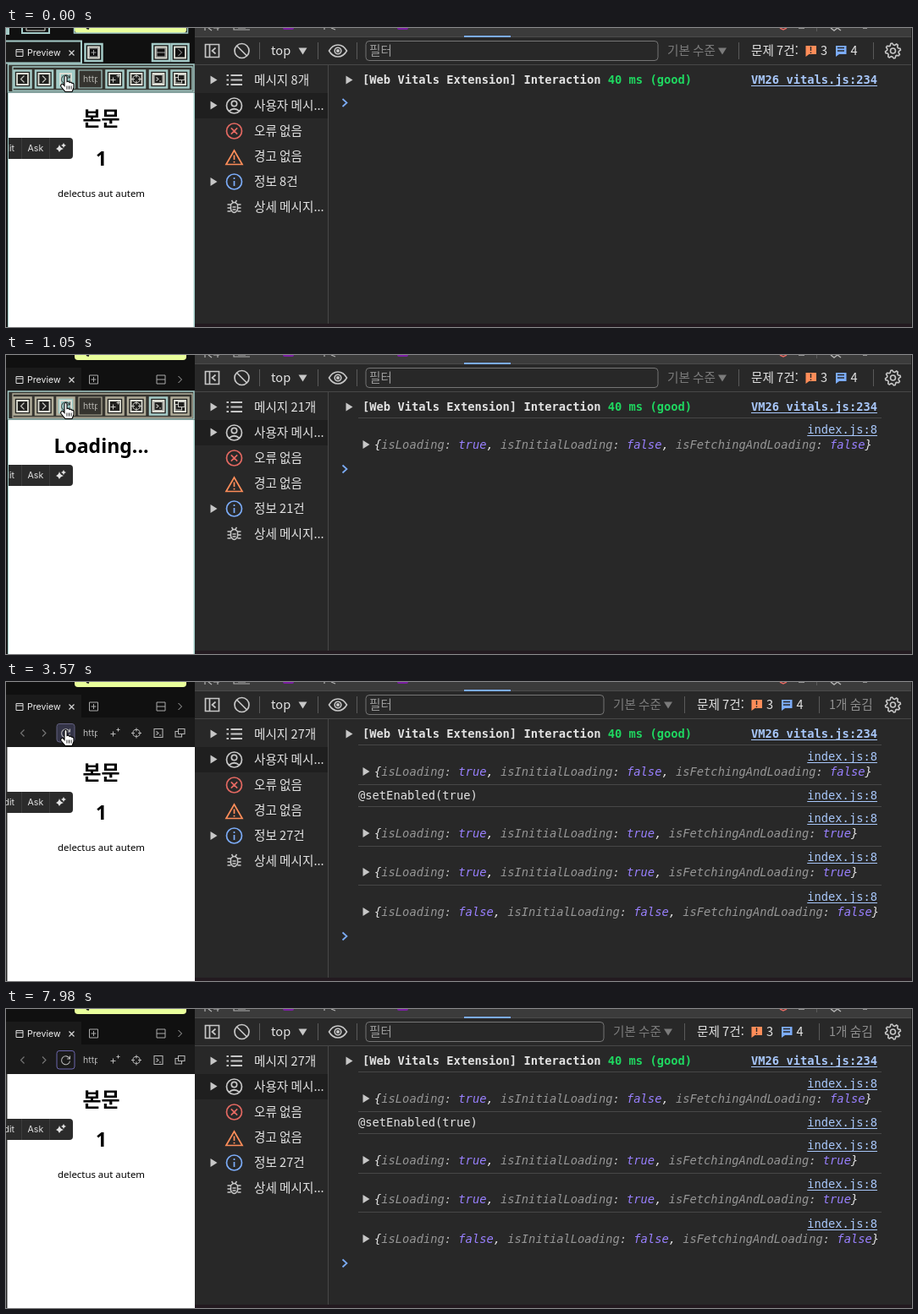
Write an HTML page with a canvas that moves like this. It is 1070 px wide and 354 px high and loops after 8.47 s.

```html
<!DOCTYPE html>
<html lang="ko">
<head>
<meta charset="utf-8">
<title>Console and preview</title>
<style>
html, body { margin: 0; width: 100%; height: 100%; overflow: hidden; background: #282828; }
canvas { display: block; }
</style>
</head>
<body>
<canvas id="stage" width="1070" height="354"></canvas>
<script>
const c = document.getElementById('stage').getContext('2d');
const LOOP = 8470, STEP = 70;
const KOREAN = '"Noto Sans CJK KR", "Noto Sans CJK JP", "Noto Sans CJK", sans-serif';
const UI = `14.6px ${KOREAN}`;
const MONO = '13.75px "DejaVu Sans Mono", monospace';
const SMALL = '10.6px Inter, sans-serif';
const LIGHT = '#e3e3e3', ICON = '#c7c7c7', DIM = '#858585', BLUE = '#7cacf8', ORANGE = '#fe8d59', LINK = '#a8c7fa';

// Value of the last step that has begun at time t
const stepAt = (t, steps) => steps.filter(([start]) => t >= start).pop()[1];

function rect(x, y, w, h, color) {
  c.fillStyle = color;
  c.fillRect(x, y, w, h);
}
function frame(x, y, w, h, color, width = 1, radius = 0) {
  c.strokeStyle = color;
  c.lineWidth = width;
  c.beginPath();
  c.roundRect(x, y, w, h, radius);
  c.stroke();
}
function box(x, y, w, h, color, radius) {
  c.fillStyle = color;
  c.beginPath();
  c.roundRect(x, y, w, h, radius);
  c.fill();
}
function text(str, x, y, font, color, align = 'left') {
  c.font = font;
  c.fillStyle = color;
  c.textAlign = align;
  c.fillText(str, x, y);
}
function shape(d, x, y, { fill, line, width = 1.5 }) {
  c.save();
  c.translate(x, y);
  const path = new Path2D(d);
  if (fill) { c.fillStyle = fill; c.fill(path); }
  if (line) { c.strokeStyle = line; c.lineWidth = width; c.stroke(path); }
  c.restore();
}
const circle = r => `M${r} 0A${r} ${r} 0 1 1 ${-r} 0A${r} ${r} 0 1 1 ${r} 0Z`;
const square = r => `M${-r} ${-r}H${r}V${r}H${-r}Z`;
const rightArrow = (x, y) => shape('M-3.5-5L4.5 0L-3.5 5Z', x, y, { fill: ICON });
const downArrow = (x, y, color) => shape('M-5-3.5H5L0 4.5Z', x, y, { fill: color });
const divider = x => rect(x, 17, 1, 20, '#5a5a5a');

const gear = Array.from({ length: 32 }, (_, i) => {
  const r = (i + 1) % 4 < 2 ? 9 : 6.9, a = (i - 0.5) * Math.PI / 16;
  return `${i ? 'L' : 'M'}${r * Math.cos(a)} ${r * Math.sin(a)}`;
}).join('') + 'Z';
const sparkle = 'M-1-4Q0 0 4 1Q0 2-1 5Q-2 2-5 1Q-2 0-1-4ZM4-6L5-4L7-3L5-2L4 0L3-2L1-3L3-4Z';

function topStrip() {
  rect(223, 0, 847, 10, '#3b3b3b');
  rect(223, 10, 847, 1, '#4a4a4a');
  rect(541, 9, 55, 2, BLUE);
  shape('M0 0V3M4 0L8 3M10 0H17M15 0V3M34 0V2H53M39 0H48M141 0V2M149 0L154 2', 235, 0, { line: '#b0b0b0', width: 1.2 });
  box(327, -4, 13, 6, '#7b1fa2', 2);
  box(462, -4, 13, 6, '#7b1fa2', 2);
  shape('M0 0L4 2L8 0', 914, 0, { line: '#e46962' });
  shape('M0 0H7M38 0L42 3L46 0L50 3M76 0H81', 936, 0, { line: '#b0b0b0' });
  rect(957, 0, 1, 4, '#5a5a5a');
}

function issueIcon(x, color, mark) {
  shape('M-6-6H6.5V4H-2L-6 7Z', x, 27, { fill: color });
  shape(mark, x, 26, { line: '#282828', width: 1.4 });
}

function toolbar(t) {
  const hidden = t >= 420 && t < 770 ? 4 : t >= 2100 ? 1 : 0;
  const shift = hidden ? -64 : 0;
  rect(223, 43, 847, 1, '#474747');
  shape('M-8-7.5H8V7.5H-8ZM-3-7.5V7.5M4-3.5L0 0L4 3.5', 243.5, 27, { line: ICON, width: 1.7 });
  shape(circle(8.5) + 'M-6-6L6 6', 278.5, 27, { line: ICON, width: 1.7 });
  divider(299);
  text('top', 313, 32, UI, LIGHT);
  downArrow(350.5, 27, ICON);
  divider(368);
  shape('M-10.5 0Q-6.5-7 0-7T10.5 0Q6.5 7 0 7T-10.5 0Z' + circle(3.8), 392, 27, { line: ICON, width: 1.6 });
  shape(circle(2), 392, 27, { fill: ICON });
  divider(414);
  frame(425, 15.5, 345 + shift, 23, '#757575', 1, 4);
  text('필터', 429, 32, UI, '#9a9a9a');
  c.save();
  c.translate(shift, 0);
  text('기본 수준', 781, 32, UI, '#7b7b7b');
  downArrow(846, 27, '#7b7b7b');
  divider(865);
  text('문제 7건:', 880, 32, UI, LIGHT);
  issueIcon(950.5, ORANGE, 'M0-4V1M0 2.5V4');
  text('3', 962, 32, UI, LIGHT);
  issueIcon(986, BLUE, 'M-4-2.5H4M-4 1H4');
  text('4', 997.5, 32, UI, LIGHT);
  divider(1024);
  c.restore();
  if (hidden) text(`${hidden}개 숨김`, 972, 32, UI, '#8f8f8f');
  shape(gear + circle(3), 1047.5, 27, { line: ICON, width: 1.6 });
}

function sidebar(t) {
  const count = stepAt(t, [[0, 8], [210, 10], [350, 13], [490, 15], [700, 18], [910, 20],
    [1050, 21], [2030, 22], [2940, 24], [3010, 25], [3080, 26], [3500, 27]]);
  rect(223, 77, 157, 30, '#1f1f1f');
  rect(380, 44, 1, 306, '#474747');
  const labels = [`메시지 ${count}개`, '사용자 메시...', '오류 없음', '경고 없음', `정보 ${count}건`, '상세 메시지...'];
  labels.forEach((label, i) => text(label, 293, 67 + i * 30, UI, LIGHT));
  [61.5, 91.5, 182].forEach(y => rightArrow(245, y));
  const x = 269.5;
  shape('M-9-5.5H-6.5M-4-5.5H9.5M-9 0H-6.5M-4 0H9.5M-9 5.5H-6.5M-4 5.5H9.5', x, 61.5, { line: ICON, width: 1.8 });
  shape(circle(9) + 'M3.2-2.5A3.2 3.2 0 1 1-3.2-2.5A3.2 3.2 0 1 1 3.2-2.5M-6 6.5Q0 1 6 6.5', x, 92, { line: ICON, width: 1.7 });
  shape(circle(9) + 'M-3.7-3.7L3.7 3.7M3.7-3.7L-3.7 3.7', x, 122, { line: '#e46962', width: 1.7 });
  shape('M0-8L9.5 8.5H-9.5ZM0-2.5V3M0 4.7V6.5', x, 153, { line: ORANGE, width: 1.7 });
  shape(circle(9) + 'M0-1V5M0-5V-3', x, 182, { line: BLUE, width: 1.7 });
  shape('M-4-3Q0-8 4-3V3Q0 10-4 3ZM-8-3H-4M4-3H8M-8 1H-4M4 1H8M-8 5H-4M4 5H8M-2 0H2M-2 3H2M-3-8L-1-5M3-8L1-5', x, 212, { line: ICON, width: 1.5 });
}

function link(label, y, font = MONO) {
  text(label, 1029, y, font, LINK, 'right');
  const w = c.measureText(label).width;
  rect(1029 - w, y + 2, w, 1, LINK);
}

function stateLine(y, values) {
  rightArrow(425, y - 5);
  let x = 435;
  const put = (str, color) => {
    text(str, x, y, `italic ${MONO}`, color);
    x += c.measureText(str).width;
  };
  put('{', LIGHT);
  ['isLoading', 'isInitialLoading', 'isFetchingAndLoading'].forEach((key, i) => {
    put(key, '#969696');
    put(': ', '#b5b5b5');
    put(String(values[i]), '#9980ff');
    put(i < 2 ? ', ' : '}', LIGHT);
  });
}

const logs = [
  { start: 980, values: [true, false, false] },
  { start: 2940, message: '@setEnabled(true)' },
  { start: 3010, values: [true, true, true] },
  { start: 3080, values: [true, true, true] },
  { start: 3500, values: [false, false, false] },
];

function consoleLog(t) {
  const bold = `bold ${MONO}`;
  rightArrow(405, 61.5);
  text('[Web Vitals Extension] Interaction ', 421, 66, bold, LIGHT);
  text('40 ms (good)', 421 + c.measureText('[Web Vitals Extension] Interaction ').width, 66, bold, '#1fd760');
  link('VM26 vitals.js:234', 66, bold);
  let top = 74.5;
  for (const { start, values, message } of logs) {
    if (t < start) break;
    rect(416, Math.floor(top), 618, 1, '#474747');
    link('index.js:8', Math.round(top + 18));
    if (message) text(message, 416, Math.round(top + 18), MONO, LIGHT);
    else stateLine(Math.round(top + 36), values);
    top += message ? 26.5 : 46.5;
  }
  shape('M-2.5-4.5L2.5 0L-2.5 4.5', 400, top + 14, { line: BLUE, width: 1.7 });
}

function page(t) {
  rect(1.5, 77, 221.5, 277, '#fff');
  const heading = str => text(str, 112.5, 116, '700 23px "Noto Sans", sans-serif', '#000', 'center');
  if (t >= 980 && t < 3500) heading('Loading...');
  if (t < 140 || t >= 3500) {
    text('본문', 112.5, 116, `700 24px ${KOREAN}`, '#000', 'center');
    text('1', 112.5, 163, '700 23px "Noto Sans", sans-serif', '#000', 'center');
    text('delectus aut autem', 112.5, 200, '11.4px "Noto Sans", sans-serif', '#000', 'center');
  }
  box(-6, 130, 85, 25, '#2b2b2b', 4);
  text('Edit', 10, 146, SMALL, LIGHT, 'right');
  text('Ask', 25.5, 146, SMALL, LIGHT);
  rect(18, 130, 1, 25, '#3c3c3c');
  rect(51, 130, 1, 25, '#3c3c3c');
  shape(sparkle, 64, 142, { fill: LIGHT });
}

const navIcons = [
  [19.5, 'M2-4L-2 0L2 4'],
  [45, 'M-2-4L2 0L-2 4'],
  [70.5, 'M4.5-2A5 5 0 1 0 5 1M5-5V-1.5H1.5'],
  [128.5, 'M-5 1H1M-2-2V4M2-4H6M4-6V-2'],
  [154, circle(4.2) + 'M0-6V-2M0 2V6M-6 0H-2M2 0H6'],
  [180, square(5) + 'M-2.5-2L0 0L-2.5 2M1 2.5H3'],
  [205.5, 'M-2-5H5.5V1H-2ZM-2-2H-5.5V4.5H2V1'],
];

function mark(x, y, color) {
  frame(x - 10, y - 10, 20, 20, color, 2.5);
  frame(x - 6.5, y - 6.5, 13, 13, '#dedfd5', 1.8);
}

function browser(t) {
  rect(0, 0, 223, 42, '#101010');
  rect(0, 15, 89, 27, '#1a1a1a');
  rect(0, 42, 223, 35, '#1a1a1a');
  box(81, -10, 132, 16, '#e9ff9b', 4);
  shape('M0 0L3 1', 95, 0, { line: '#222', width: 2 });
  const gray = { line: '#a9a9a9', width: 1 };
  shape('M-4-4H4V4H-4ZM-4-1.5H4', 16, 29.5, { line: '#ddd', width: 1 });
  text('Preview', 25, 33, SMALL, '#f0f0f0');
  shape('M-3-3L3 3M3-3L-3 3', 77.5, 29.5, { line: '#ddd', width: 1.1 });
  shape(square(5) + 'M-3 0H3M0-3V3', 103.5, 29, gray);
  shape(square(5) + 'M-5 0H5', 183, 29, gray);
  shape('M-2-4L2 0L-2 4', 205.5, 29, gray);
  if (t >= 1540) {
    if (t < 6160) box(60, 50, 21, 21, '#343447', 3);
    else if (t < 6230) box(60, 50, 21, 21, '#29293c', 3);
    frame(60, 49.5, 21, 21.5, t < 6160 ? '#626080' : '#6b66ac', 1, 3);
  }
  navIcons.forEach(([x, d], i) => shape(d, x, 60.5, { line: i < 2 ? '#777' : '#b5b5b5', width: 1.1 }));
  c.save();
  c.beginPath();
  c.rect(90, 50, 18, 22);
  c.clip();
  text('https', 91, 64, SMALL, '#bbb');
  c.restore();
}

function highlights(t) {
  const teal = '#a5cbc8';
  if (t < 350) {
    c.globalAlpha = 1 - t / 350;
    frame(-2, 15.5, 91, 26, teal, 2);
    [[103.5, 29], [183, 29], [205.5, 29]].forEach(([x, y]) => mark(x, y, teal));
    frame(19, -5, 32, 11, teal, 2);
    frame(24, -5, 22, 8, '#dedfd5', 1);
    frame(80.5, -6, 134, 12, teal, 1.5);
    rect(0, 0, 4, 8, teal);
  }
  if (t < 1540) {
    c.globalAlpha = t < 1400 ? 1 : (1540 - t) / 210;
    const warm = Math.min(1, t / 560);
    const tint = `rgb(${165 + 12 * warm},${203 - 30 * warm},${200 - 46 * warm})`;
    rect(0, 77, 2, 277, '#171717');
    rect(2, 77, 1, 277, '#9fc9c5');
    rect(221.5, 77, 1.5, 277, '#9fc9c5');
    rect(3, 43, 219, 33, 'rgba(150,145,125,.22)');
    frame(2.5, 43, 219.5, 33, teal, 1.5);
    frame(8, 46, 212, 28, tint, 1.3);
    navIcons.forEach(([x], i) => {
      rect(x - 10, 50.5, 20, 20, i === 2 ? '#9bcac6' : '#20201e');
      mark(x, 60.5, i === 5 ? teal : tint);
      shape(navIcons[i][1], x, 60.5, { line: i === 2 ? '#404846' : '#c9c9c4', width: 1.1 });
    });
    frame(86, 50, 27, 21, tint, 1.2);
  }
  c.globalAlpha = 1;
}

const route = [[6160, 83, 75], [6370, 180, 130], [6580, 380, 235], [6790, 550, 315], [6930, 603, 338],
  [7000, 592, 339], [7560, 575, 355], [7909, 575, 358], [7910, 562, 350], [7979, 562, 350]];

function pointer(t) {
  if (t < 6160) {
    shape('M-3 3V-7Q-3-9-1.5-9T0-7V-2Q2-3 3-1Q5-2 6 0Q8-1 8 2V5Q7 8 6 10H-2L-7 4Q-8 2-6 1Q-5 0-3 3Z',
      72, 65.5, { fill: '#fff', line: '#000', width: 1.1 });
    shape('M0 3V7M2.5 3V7M5 3V7', 72, 65.5, { line: '#000', width: 0.9 });
    return;
  }
  const next = route.findIndex(([start]) => start > t);
  if (next < 0) return;
  const [t0, x0, y0] = route[next - 1], [t1, x1, y1] = route[next];
  const u = (t - t0) / (t1 - t0);
  shape('M0 0V14L3.2 11L5.6 16.5L8 15.5L5.7 10H10Z', x0 + (x1 - x0) * u, y0 + (y1 - y0) * u,
    { fill: '#000', line: '#fff', width: 1.1 });
}

function draw(t) {
  rect(0, 0, 1070, 354, '#282828');
  topStrip();
  toolbar(t);
  sidebar(t);
  consoleLog(t);
  rect(223, 350, 847, 4, '#231a20');
  rect(1069, 0, 1, 354, '#1b1b1b');
  browser(t);
  page(t);
  highlights(t);
  pointer(t);
}

const begin = performance.now();
function tick() {
  const elapsed = (performance.now() - begin) % LOOP;
  draw(Math.floor(elapsed / STEP) * STEP);
  requestAnimationFrame(tick);
}
tick();
</script>
</body>
</html>
```
